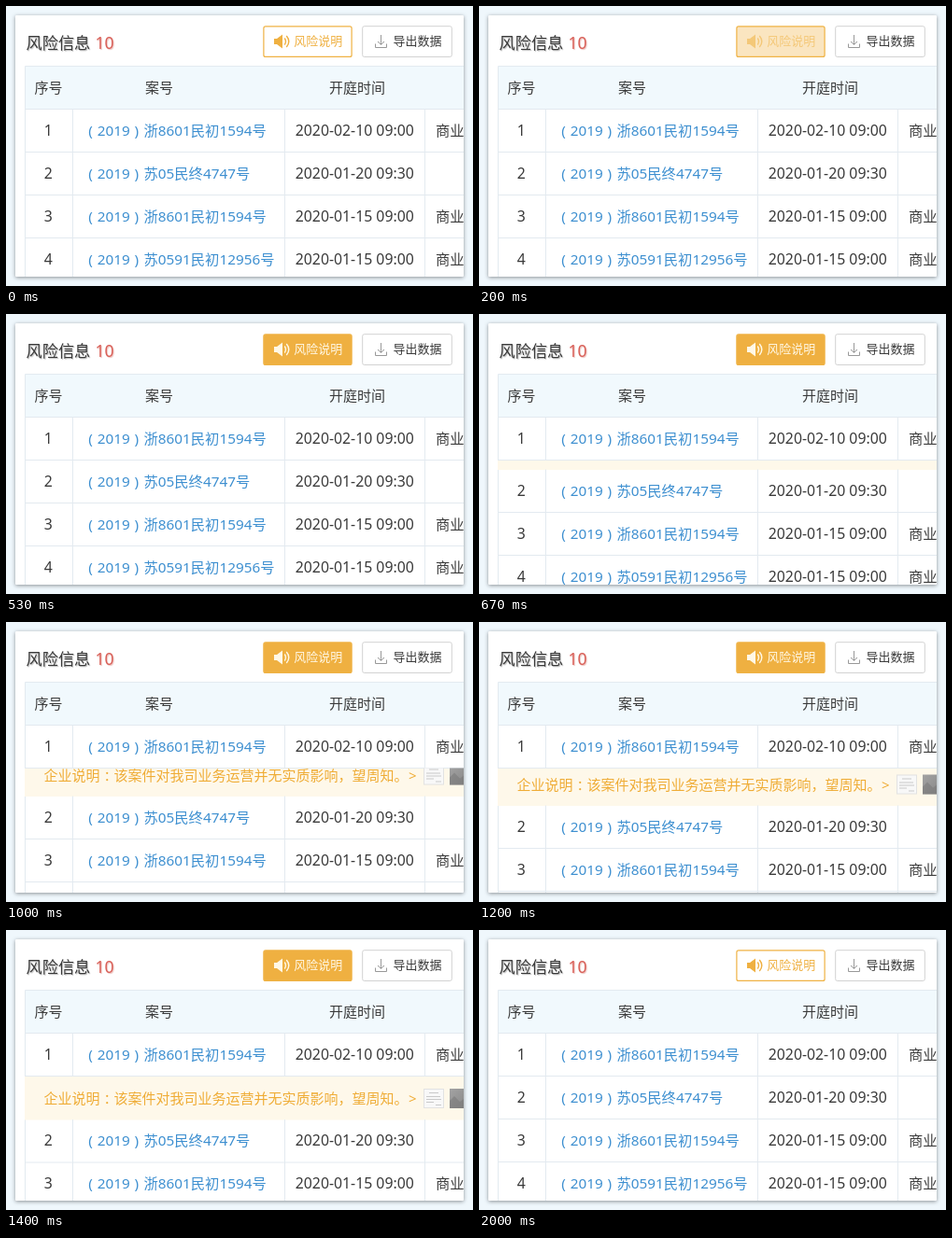
These frames come from a looping animation (500x300 px, 2.2 s). An HTML page:

```html
<!DOCTYPE html>
<html lang="zh-CN">
<head>
<meta charset="utf-8">
<style>
  html, body { margin: 0; width: 100%; height: 100%; overflow: hidden; background: #eff7fc; }
  svg { display: block; width: 500px; height: 300px; font-family: "Noto Sans", "Noto Sans CJK SC", "Noto Sans CJK", sans-serif; }
  text { fill: #3a3a3a; font-size: 15.3px; white-space: pre; }
  .head { font-size: 15px; }
  .wide { font-size: 15.8px; }
  .small { font-size: 13px; }
  .link { fill: #3d8fd0; }
  .grid { stroke: #e3eaf0; fill: none; }
  .card { filter: drop-shadow(0 1.5px 2px rgba(70, 75, 80, .6)); }
  .title { font-size: 17.2px; text-shadow: 1px 1px 1px rgba(60, 60, 60, .35); }
  .count { font-size: 17.5px; fill: #d85e56; text-shadow: 1px 1px 1px rgba(200, 80, 70, .35); }
  #note text { fill: #efac35; font-size: 15px; }
</style>
</head>
<body>
<svg viewBox="0 0 500 300">
  <defs>
    <clipPath id="cardClip"><rect x="10" y="10" width="480" height="280"/></clipPath>
    <clipPath id="noteClip"><rect id="noteWindow" x="20" y="156.5" width="470" height="0"/></clipPath>
    <linearGradient id="photo" x2="1" y2="1">
      <stop stop-color="#a3a3a3"/><stop offset="1" stop-color="#858585"/>
    </linearGradient>
  </defs>
  <rect class="card" x="10" y="10" width="480" height="280" rx="1" fill="#fff"/>
  <g clip-path="url(#cardClip)">
    <text class="title" x="21.5" y="46">风险信息</text>
    <text class="count" x="95.5" y="46">10</text>

    <rect id="button" x="275.9" y="21.9" width="94.2" height="32.5" rx="2" stroke="#efb244" stroke-width="1.2"/>
    <g id="buttonLabel">
      <path d="M287 35h3l6-4.5v15l-6-4.5h-3z"/>
      <path id="waves" d="M298.3 34.5q2.4 3.5 0 7M300.3 32q5 6 0 12" fill="none" stroke-width="1.4"/>
      <text class="small" id="buttonText" x="308.3" y="42.3">风险说明</text>
    </g>

    <rect x="381.7" y="21.7" width="95.6" height="32.8" rx="2" fill="#fff" stroke="#d2d2d2"/>
    <path d="M401.5 31v10M398 38l3.5 3.5l3.5-3.5M395.5 40.5v4h12v-4" fill="none" stroke="#999"/>
    <text class="small" x="414.5" y="42.3">导出数据</text>

    <rect x="20" y="65" width="470" height="45" fill="#f1f9fd"/>
    <path class="grid" d="M20.5 290V64.5H490M20 110.5H490"/>
    <text class="head" x="30.5" y="93.2">序号</text>
    <text class="head" x="149" y="93.2">案号</text>
    <text class="head" x="346" y="93.2">开庭时间</text>

    <g id="firstRow"></g>
    <rect id="strip" x="20" y="157" width="470" height="0" fill="#fef8ea"/>
    <g clip-path="url(#noteClip)">
      <g id="note">
        <text x="40.5" y="186.3">企业说明<tspan dx="4">：</tspan><tspan dx="-4">该案件对我司业务运营并无实质影响，望周知。</tspan></text>
        <text x="431" y="186.3">&gt;</text>
        <rect x="447.5" y="170.5" width="21" height="20" fill="#f8f8f8" stroke="#e2e2e2"/>
        <path d="M453 174.5h10M450 178.5h15M450 181.5h16M450 184.5h8M460 187.5h6" stroke="#c9c9c9"/>
        <rect x="475" y="170" width="21" height="21" fill="url(#photo)"/>
        <path d="M475 183l5-5l6 6l4-3v10h-15z" fill="#777" opacity=".5"/>
      </g>
    </g>
    <g id="lowerRows"></g>
  </g>
</svg>
<script>
const byId = id => document.getElementById(id);
const rows = [
  ["浙8601民初1594号", "2020-02-10 09:00", "商业"],
  ["苏05民终4747号", "2020-01-20 09:30", ""],
  ["浙8601民初1594号", "2020-01-15 09:00", "商业"],
  ["苏0591民初12956号", "2020-01-15 09:00", "商业"]
];
const columns = [71.5, 298.5, 448.5];
const rowHeight = 46;

function rowMarkup([caseNo, date, category], i) {
  const top = 110.5 + i * rowHeight, base = top + 28.3;
  const label = (x, content, style = "") => `<text class="${style}" x="${x}" y="${base}">${content}</text>`;
  const lines = columns.map(x => `M${x} ${top}v${rowHeight}`).join("") + `M20 ${top + rowHeight}H490`;
  return `<path class="grid" d="${lines}"/>`
    + label(40.8, i + 1, "wide")
    + label(88.3, "(", "link") + label(97.8, "2019", "link") + label(137.5, ")", "link")
    + label(147.5, caseNo, "link")
    + label(309.8, date, "wide") + label(460, category);
}

const markup = rows.map(rowMarkup);
byId("firstRow").innerHTML = markup[0];
byId("lowerRows").innerHTML = markup.slice(1).join("");

// Each entry is [start ms, value]; values hold until the next start.
const fillSteps = [[0, 0], [200, 1 / 3], [400, 2 / 3], [530, 1], [2000, 0]];
const gapSteps = [[0, 0], [670, 10], [870, 20], [1000, 30], [1200, 40], [1400, 46.5], [2000, 0]];
const valueAt = (steps, t) => steps.filter(([start]) => start <= t).pop()[1];
const mix = (from, to, k) => `rgb(${from.map((c, i) => Math.round(c + (to[i] - c) * k))})`;
const white = [255, 255, 255], cream = [255, 248, 230], amber = [239, 176, 65];

function draw(now) {
  const t = now % 2200;
  const fill = valueAt(fillSteps, t), gap = valueAt(gapSteps, t);
  const ink = mix(amber, cream, fill);
  byId("button").setAttribute("fill", mix(white, amber, fill));
  byId("buttonLabel").setAttribute("fill", ink);
  byId("waves").setAttribute("stroke", ink);
  byId("buttonText").style.fill = ink;
  byId("strip").setAttribute("height", gap);
  byId("noteWindow").setAttribute("height", gap);
  byId("note").setAttribute("transform", `translate(0 ${gap - 46.5})`);
  byId("lowerRows").setAttribute("transform", `translate(0 ${gap})`);
}

const started = performance.now();
function tick() {
  draw(performance.now() - started);
  requestAnimationFrame(tick);
}
tick();
</script>
</body>
</html>
```
